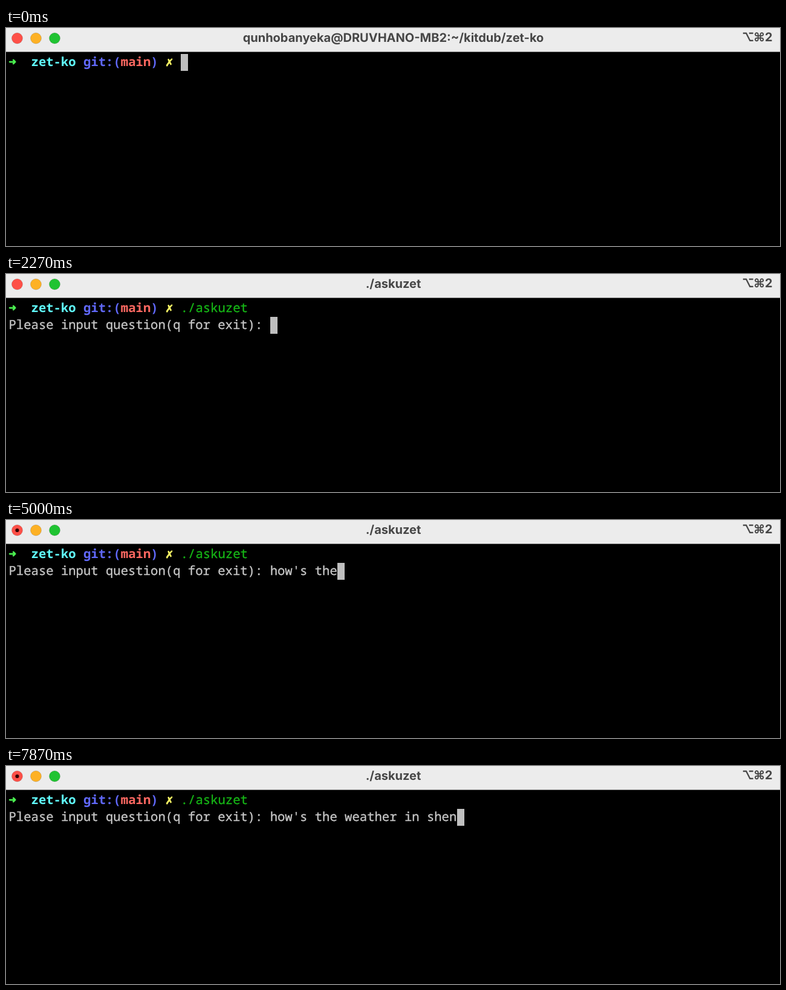
An HTML page that plays this animation: 1280 px wide and 361 px high, repeating every 8 s.

```html
<!DOCTYPE html>
<html lang="en">
<head>
<meta charset="utf-8">
<title>Terminal</title>
<style>
html, body { margin: 0; width: 100%; height: 100%; overflow: hidden; background: #000; }
svg { display: block; width: 1280px; height: 361px; }
text { white-space: pre; text-rendering: geometricPrecision; }
.bar { font: 700 20px Inter, "DejaVu Sans", sans-serif; fill: #464646; }
.lights { stroke: #000; stroke-opacity: .14; }
.term {
  font: 20.597px "Noto Sans Mono", "DejaVu Sans Mono", monospace;
  color: #c7c7c7; fill: currentColor; stroke: currentColor; stroke-width: .35px;
}
.term text { fill: currentColor; stroke: currentColor; }
.term .bold { font-weight: 700; stroke-width: 0; }
.term .symbol { font-weight: 700; stroke-width: .8px; }
</style>
</head>
<body>
<svg viewBox="0 0 1280 361">
  <rect width="1280" height="361"/>
  <rect width="1280" height="39" fill="#ececec"/>
  <rect y="39" width="1280" height="1" fill="#7c7c7c"/>
  <g class="lights">
    <circle cx="18.5" cy="17" r="9" fill="#fe5048"/>
    <circle cx="49.5" cy="17" r="9" fill="#fdb125"/>
    <circle cx="80.5" cy="17" r="9" fill="#20c332"/>
  </g>
  <circle id="mark" cx="18.5" cy="17" r="3.1" fill="#350302"/>
  <g class="bar">
    <text id="title" x="640.5" y="23" text-anchor="middle"></text>
    <text x="1217 1236 1255" y="22">⌥⌘2</text>
  </g>
  <rect id="cursor" width="12" height="28" fill="#bfbfbf"/>
  <g class="term" id="term"></g>
</svg>
<script>
const $ = id => document.getElementById(id);
const LOOP = 8000, LEFT = 4.5, CELL = 12.358;
const COMMAND = "./askuzet", PROMPT = "Please input question(q for exit): ";
const QUESTION = "how's the weather in shen";
const HOME = "qunhobanyeka@DRUVHANO-MB2:~/kitdub/zet-ko";
const ENTER = 1800, MARK = 2530, COMMAND_COL = 23;

// Time of each key press, in ms
const commandKeys = [200, 400, 600, 730, 870, 1000, 1130, 1270, 1400];
const questionKeys = [
  2930, 3070, 3200, 3800, 4000, 4200, 4330, 4730, 4870, 5130,
  5330, 5600, 5730, 5930, 6070, 6200, 6330, 6530, 6800, 6930,
  7130, 7530, 7600, 7730, 7870
];

const colX = col => LEFT + col * CELL;
const typed = (keys, t) => keys.filter(k => k <= t).length;

function addShape(tag, attrs) {
  const el = document.createElementNS("http://www.w3.org/2000/svg", tag);
  for (const name in attrs) el.setAttribute(name, attrs[name]);
  $("term").append(el);
  return el;
}

function addText(row, col, color = "", content = "", style = "") {
  const el = addShape("text", { x: colX(col), y: 63.2 + row * 28, class: style });
  el.style.color = color;
  el.textContent = content;
  return el;
}

addText(0, 0, "#4df552", "➜", "symbol");
addText(0, 3, "#60fdff", "zet-ko", "bold");
addText(0, 10, "#6068fa", "git:(", "bold");
addText(0, 15, "#ff6861", "main", "bold");
addText(0, 19, "#6068fa", ")", "bold");
addText(0, 21, "#fefb67", "✗", "symbol");
const command = addText(0, COMMAND_COL);
const under = addText(0, COMMAND_COL, "#f4f4f4");
const hint = addText(0, COMMAND_COL, "#606060");
const line = addText(1, 0);
const underline = addShape("rect", { x: colX(COMMAND_COL), y: 67, height: 1.2 });

function draw(t) {
  const running = t >= ENTER;
  const n = typed(commandKeys, t), q = typed(questionKeys, t);
  const complete = n === COMMAND.length;

  $("title").textContent = running ? COMMAND : HOME;
  $("mark").style.display = t >= MARK ? "" : "none";

  command.textContent = COMMAND.slice(0, n);
  command.style.color = complete ? "#16b516" : "";
  underline.setAttribute("width", complete ? 0 : n * CELL);

  // The completion hint follows the first key
  under.textContent = n ? COMMAND.slice(n, n + 1) : "";
  under.setAttribute("x", colX(COMMAND_COL + n));
  hint.textContent = n ? COMMAND.slice(n + 1) : "";
  hint.setAttribute("x", colX(COMMAND_COL + n + 1));

  line.textContent = running ? PROMPT + QUESTION.slice(0, q) : "";
  $("cursor").setAttribute("x", Math.round(colX(running ? PROMPT.length + q : COMMAND_COL + n)));
  $("cursor").setAttribute("y", running ? 71 : 43);
}

function tick() {
  draw(performance.now() % LOOP);
  requestAnimationFrame(tick);
}
tick();
</script>
</body>
</html>
```
